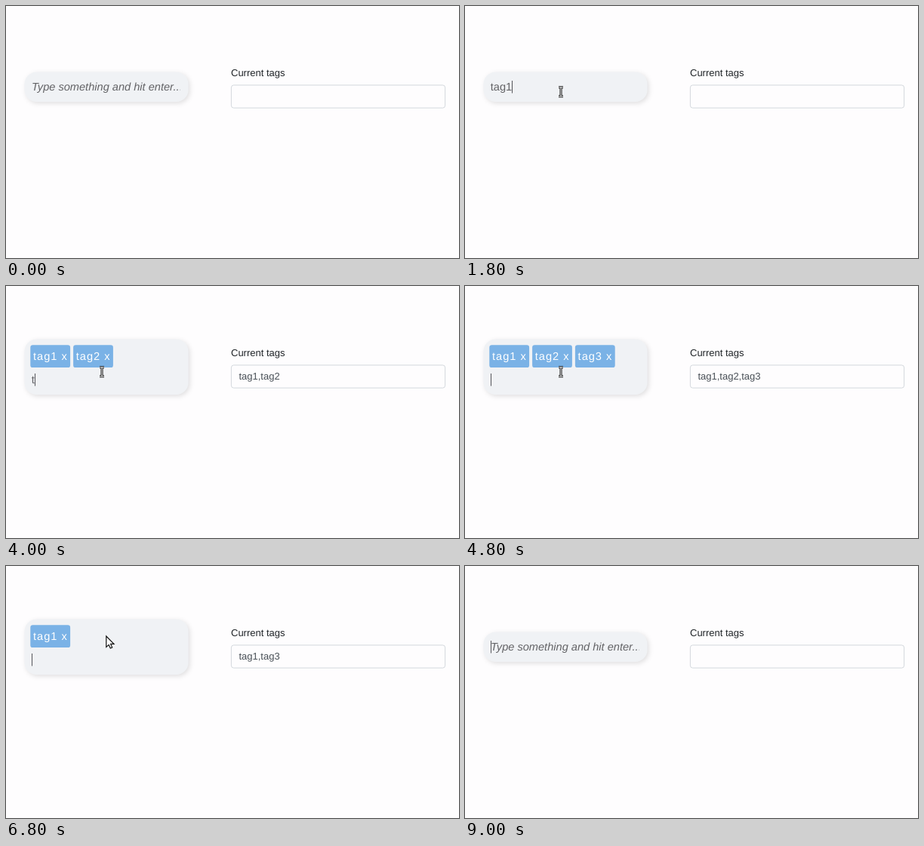
Recreate the animation shown at these times as an HTML page. Size 600 by 334 pixels, loop 9600 ms.

```html
<!DOCTYPE html>
<html lang="en">
<head>
<meta charset="utf-8">
<title>Tag input</title>
<style>
  html, body { margin: 0; width: 100%; height: 100%; overflow: hidden; background: #fefdfe; }
  svg { display: block; width: 600px; height: 334px; font: 13px "Liberation Sans", Arial, sans-serif; text-rendering: geometricPrecision; }
  #box { fill: #f0f2f5; filter: drop-shadow(2px 2px 3px rgba(0, 0, 0, .12)); }
  .entry { font-size: 14.6px; fill: #636366; }
  .tag rect { fill: #7ab2e6; }
  .tag text { font-size: 14.6px; letter-spacing: 1px; fill: #fff; }
</style>
</head>
<body>
<svg viewBox="0 0 600 334">
  <clipPath id="field"><rect x="33" y="90" width="197.3" height="34"/></clipPath>
  <rect id="box" x="24.5" width="217" rx="16"/>
  <g clip-path="url(#field)">
    <text id="hint" class="entry" x="34" y="112" font-style="italic">Type something and hit enter...</text>
  </g>
  <g id="tags"></g>
  <text id="typed" class="entry" x="33.8"></text>
  <rect id="caret" width="1" height="16.5" fill="#55555a"/>
  <text x="298" y="92.6" fill="#212529">Current tags</text>
  <rect x="298.4" y="104.9" width="283.2" height="30.2" rx="3.2" fill="#fefdfe" stroke="#ced4da" stroke-width=".9"/>
  <text id="output" x="308.4" y="124.2" fill="#495057"></text>
  <path id="arrow" d="M0 0V14.4L3.3 11.4L5.5 16L7.9 15L5.8 10.4H10.2Z" fill="#fff" stroke="#111" stroke-width="1.2"/>
  <g id="beam" fill="none">
    <path d="M-3 -6H3M-3 6H3M0 -6V6" stroke="#111" stroke-width="3"/>
    <path d="M-3 -6H3M-3 6H3M0 -6V6" stroke="#fff" stroke-width="1"/>
  </g>
</svg>
<script>
const LOOP = 9600, STEP = 100;
const el = id => document.getElementById(id);

// time, typed text, tags, output value
const states = [
  [0, '', '', ''],
  [1300, 't', '', ''], [1400, 'ta', '', ''], [1500, 'tag', '', ''], [1800, 'tag1', '', ''],
  [2100, '', 'tag1', 'tag1'],
  [2600, 't', 'tag1', 'tag1'], [2700, 'ta', 'tag1', 'tag1'],
  [2900, 'tag', 'tag1', 'tag1'], [3100, 'tag2', 'tag1', 'tag1'],
  [3300, '', 'tag1,tag2', 'tag1,tag2'],
  [4000, 't', 'tag1,tag2', 'tag1,tag2'], [4100, 'ta', 'tag1,tag2', 'tag1,tag2'],
  [4200, 'tag', 'tag1,tag2', 'tag1,tag2'], [4300, 'tag3', 'tag1,tag2', 'tag1,tag2'],
  [4600, '', 'tag1,tag2,tag3', 'tag1,tag2,tag3'],
  [5900, '', 'tag1,tag3', 'tag1,tag2,tag3'], [6000, '', 'tag1,tag3', 'tag1,tag3'],
  [6800, '', 'tag1', 'tag1,tag3'], [6900, '', 'tag1', 'tag1'],
  [7700, '', '', 'tag1'], [7800, '', '', '']
];

// the caret switches on, off, on...
const blinks = [1100, 3900, 4000, 5100, 5600, 6100, 6500, 7000, 7500, 8300, 9000];

// pointer: time, x, y
const path = [
  [200, 150, 203], [1100, 127, 113.8], [4900, 127, 113.8], [5600, 132.8, 93],
  [6800, 132.8, 93], [7500, 82.6, 96.4], [7700, 82.6, 96.4], [8000, 110, 217]
];

function pointerAt(t) {
  const i = path.findIndex(p => p[0] > t);
  if (i < 1) return t === path.at(-1)[0] ? path.at(-1).slice(1) : null;
  const [t0, x0, y0] = path[i - 1], [t1, x1, y1] = path[i];
  const k = (t - t0) / (t1 - t0), e = k * k * (3 - 2 * k);
  return [x0 + (x1 - x0) * e, y0 + (y1 - y0) * e];
}

function show(node, on) { node.style.display = on ? '' : 'none'; }

function place(node, on, pos) {
  show(node, on);
  if (on) node.setAttribute('transform', `translate(${pos})`);
}

const tagMarkup = (name, i) =>
  `<g class="tag" transform="translate(${32.3 + 56.8 * i} 78.3)">` +
  `<rect width="52.8" height="29.8" rx="3.2"/><text x="3.7" y="20">${name} x</text></g>`;

function draw(now) {
  const t = Math.floor(now % LOOP / STEP) * STEP;
  const [, typed, tags, output] = states.findLast(s => s[0] <= t);
  const open = tags !== '';

  el('box').setAttribute('y', open ? 70.5 : 87.5);
  el('box').setAttribute('height', open ? 73.5 : 39.5);
  el('tags').innerHTML = open ? tags.split(',').map(tagMarkup).join('') : '';
  show(el('hint'), !open && !typed);
  el('typed').textContent = typed;
  el('typed').setAttribute('y', open ? 129.2 : 112);
  el('output').textContent = output;

  const width = typed ? el('typed').getComputedTextLength() : 0;
  show(el('caret'), blinks.filter(b => b <= t).length % 2);
  el('caret').setAttribute('x', Math.round(34 + width));
  el('caret').setAttribute('y', open ? 116 : 99);

  const pos = pointerAt(t);
  const top = open ? 111 : 94;
  const inField = pos && pos[0] > 33 && pos[0] < 231 && pos[1] > top && pos[1] < top + 27;
  place(el('beam'), inField, pos);
  place(el('arrow'), pos && !inField, pos);
}

const start = performance.now();
function tick() {
  draw(performance.now() - start);
  requestAnimationFrame(tick);
}
tick();
</script>
</body>
</html>
```
